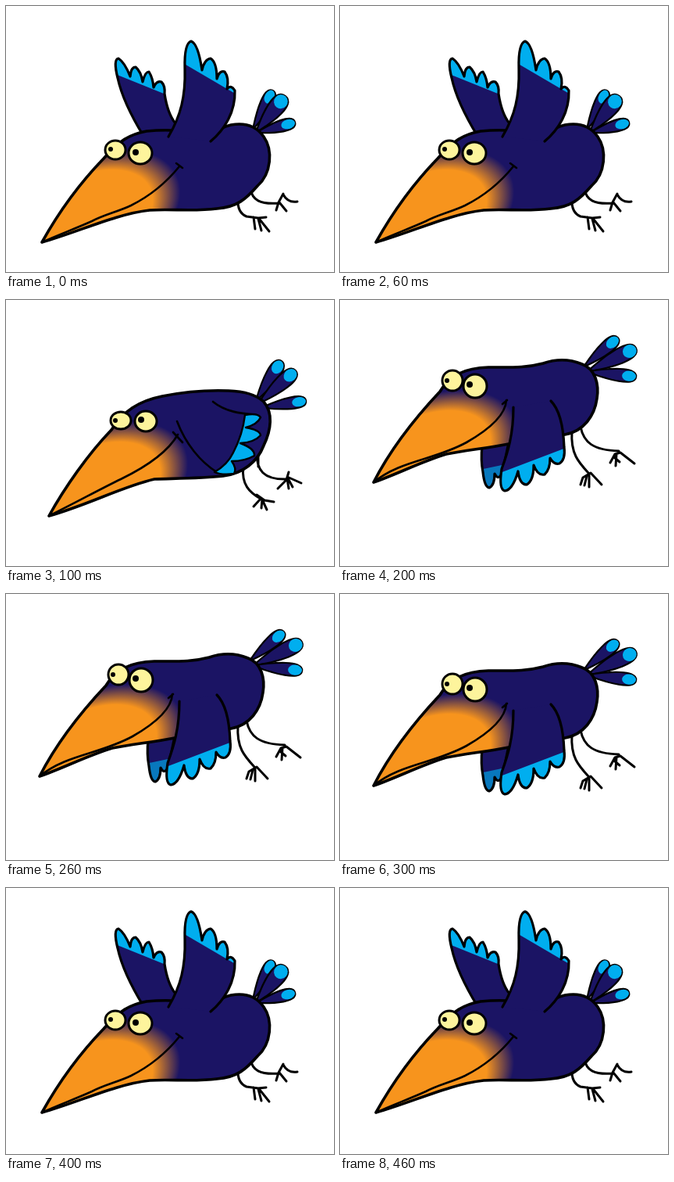
Write an HTML page with a canvas that moves like this. It is 420 px wide and 340 px high and loops after 0.5 s.

```html
<!DOCTYPE html>
<html lang="en">
<head>
<meta charset="utf-8">
<title>Flying bird</title>
<style>
html, body { margin: 0; width: 100%; height: 100%; overflow: hidden; background: #fff; }
canvas { display: block; }
</style>
</head>
<body>
<canvas id="stage" width="420" height="340"></canvas>
<script>
const ctx = document.getElementById('stage').getContext('2d');
const NAVY = '#1b1464', BLUE = '#00aeef', SHADE = '#0878bd';
const ORANGE = '#f7941d', CREAM = '#fdf49c';

// Paths are in stage pixels; tail feathers are [rootX, rootY, tipX, tipY, width].
const up = {
  body: 'M46 302C65 268 92 229 125 195C145 172 158 164 180 160C210 157 240 160 264 167Q273 155 288 152Q316 147 330 167C342 184 340 214 322 230C307 247 296 257 270 259C240 263 210 259 184 261C140 266 95 288 46 302Z',
  glow: [100, 275],
  mouth: 'M218 201L226 207M222 205C205 226 182 244 160 255C143 263 125 267 110 275C88 285 65 293 46 302',
  eyes: [[140, 184, 13, 12, 134, 183, 3], [172, 188, 15, 14, 166, 187, 4]],
  tail: [[318, 154, 341, 109, 11], [322, 159, 357, 116, 16], [324, 161, 369, 149, 11]],
  legs: 'M313 233C315 248 325 254 350 252M346 261L349 251L355 240M350 251L359 262M355 241Q361 252 373 250M297 247Q296 264 308 269L323 271L333 270M317 270L319 285M323 272L327 287M325 273L337 288',
  farWing: {
    shape: 'M176 166C160 140 148 115 143 92Q137 68 144 67Q152 72 159 90Q160 78 166 78Q173 84 175 97Q178 84 183 84Q188 92 189 104Q193 95 199 97Q204 102 203 112Q207 138 217 150L212 168',
    tips: 'M135 85L207 114V60H135Z', color: BLUE
  },
  wing: {
    shape: 'M208 167C224 140 230 115 229 80Q228 48 237 45Q246 48 251 82Q254 68 262 67Q270 72 270 93Q273 82 280 84Q286 92 283 106Q288 100 293 108C294 135 280 158 262 173',
    tips: 'M225 72L297 114V40H225Z', color: BLUE
  }
};

const mid = {
  body: 'M55 276C75 240 105 197 135 166C150 142 170 129 200 123C230 117 260 115 285 116Q316 117 330 130C342 144 340 165 330 186C322 207 303 222 278 225C250 228 220 228 190 229C150 238 105 262 55 276Z',
  glow: [110, 247],
  mouth: 'M214 169L226 182M220 172C208 193 180 213 147 229C120 242 95 256 55 276M219 155C230 184 249 207 270 220M265 130C281 143 300 145 321 147',
  eyes: [[147, 154, 13, 11, 140, 154, 3], [179, 155, 14, 13, 173, 153, 4]],
  tail: [[322, 126, 352, 79, 13], [326, 130, 370, 91, 14], [331, 137, 383, 129, 11]],
  legs: 'M321 196C321 217 329 230 360 229M323 196V213M362 220L359 230L348 241M360 228L362 241M361 228L367 239M360 226L378 234M304 213C301 236 312 246 326 254M321 249L331 256L343 258M327 253L317 264M328 255L327 266M328 255L334 268',
  patch: 'M306 147Q322 144 326 150Q322 159 307 163Q325 166 326 173Q318 182 300 183Q319 190 318 199Q306 206 289 206Q296 216 292 222Q276 224 267 220Q284 210 291 195Q303 172 306 147Z'
};

const down = {
  body: 'M43 233C63 194 95 152 128 117C140 96 160 87 190 86C220 86 238 87 260 81Q286 72 310 82C327 88 332 108 329 126C326 148 312 168 288 172L216 184C184 190 160 192 136 197C103 207 75 222 43 233Z',
  glow: [105, 207],
  mouth: 'M208 133L214 128M213 128C212 148 190 166 162 182C120 205 77 205 43 233',
  eyes: [[144, 103, 13, 13, 137, 103, 3], [173, 110, 15, 15, 166, 108, 4]],
  tail: [[315, 83, 355, 49, 12], [320, 90, 378, 62, 15], [320, 92, 378, 98, 12]],
  legs: 'M308 162C312 182 324 192 357 193M346 208L352 197L359 195L377 209M354 197L353 212M351 201L358 207M297 168C295 197 306 208 319 222M308 236L311 227L321 221L335 236M319 222L319 239M316 225L313 237',
  farWing: {
    shape: 'M182 186Q180 205 183 220Q185 239 191 240Q198 237 198 222Q203 232 208 220L216 182',
    tips: 'M178 217L212 210V245H178Z', color: SHADE
  },
  wing: {
    shape: 'M222 137C222 172 215 194 207 216Q203 242 211 244Q221 243 228 219Q230 236 239 236Q248 231 248 211Q253 225 262 223Q269 217 269 202Q274 211 281 209Q289 204 287 188C286 162 281 140 270 129',
    tips: 'M200 223L292 188V250H200Z', color: BLUE
  }
};

const cycle = [[up, 0], [mid, 0], [down, 0], [down, 12], [up, -15]];

function stroke(path, width) {
  ctx.lineWidth = width;
  ctx.stroke(new Path2D(path));
}

function drawWing({ shape, tips, color }) {
  const outline = new Path2D(shape);
  ctx.fillStyle = NAVY;
  ctx.fill(outline);
  ctx.save();
  ctx.clip(outline);
  ctx.fillStyle = color;
  ctx.fill(new Path2D(tips));
  ctx.restore();
  ctx.lineWidth = 3.2;
  ctx.stroke(outline);
}

function drawFeather([x, y, tipX, tipY, width]) {
  const length = Math.hypot(tipX - x, tipY - y);
  const h = width / 2;
  const outline = new Path2D();
  outline.moveTo(0, 0);
  outline.bezierCurveTo(length * 0.4, -h, length, -h * 2, length, 0);
  outline.bezierCurveTo(length, h * 2, length * 0.4, h, 0, 0);
  ctx.save();
  ctx.translate(x, y);
  ctx.rotate(Math.atan2(tipY - y, tipX - x));
  ctx.lineWidth = 4.5;
  ctx.stroke(outline);
  ctx.fillStyle = NAVY;
  ctx.fill(outline);
  ctx.fillStyle = BLUE;
  ctx.beginPath();
  ctx.ellipse(length - 8, 0, 9, h * 1.1, 0, 0, Math.PI * 2);
  ctx.fill();
  ctx.restore();
}

function drawEye([x, y, rx, ry, pupilX, pupilY, pupilR]) {
  ctx.beginPath();
  ctx.ellipse(x, y, rx, ry, 0, 0, Math.PI * 2);
  ctx.fillStyle = CREAM;
  ctx.fill();
  ctx.lineWidth = 3;
  ctx.stroke();
  ctx.beginPath();
  ctx.arc(pupilX, pupilY, pupilR, 0, Math.PI * 2);
  ctx.fillStyle = '#000';
  ctx.fill();
}

// The beak colour is an oval glow along the beak that fades into the navy body.
function drawBody({ body, glow: [x, y] }) {
  const outline = new Path2D(body);
  const glow = ctx.createRadialGradient(0, 0, 0.82, 0, 0, 1.15);
  glow.addColorStop(0, ORANGE);
  glow.addColorStop(1, NAVY);
  ctx.save();
  ctx.clip(outline);
  ctx.translate(x, y);
  ctx.rotate(-0.47);
  ctx.scale(115, 68);
  ctx.fillStyle = glow;
  ctx.fillRect(-9, -9, 18, 18);
  ctx.restore();
  ctx.lineWidth = 3.6;
  ctx.stroke(outline);
}

function drawBird(bird) {
  stroke(bird.legs, 3);
  bird.tail.forEach(drawFeather);
  if (bird.farWing) drawWing(bird.farWing);
  drawBody(bird);
  stroke(bird.mouth, 2.6);
  if (bird.wing) drawWing(bird.wing);
  if (bird.patch) {
    ctx.fillStyle = BLUE;
    ctx.fill(new Path2D(bird.patch));
    stroke(bird.patch, 2.4);
  }
  bird.eyes.forEach(drawEye);
}

const start = performance.now();

function render() {
  const step = Math.floor((performance.now() - start) / 100) % cycle.length;
  const [bird, dy] = cycle[step];
  ctx.setTransform(1, 0, 0, 1, 0, 0);
  ctx.fillStyle = '#fff';
  ctx.fillRect(0, 0, 420, 340);
  ctx.translate(0, dy);
  ctx.strokeStyle = '#000';
  ctx.lineCap = ctx.lineJoin = 'round';
  drawBird(bird);
  requestAnimationFrame(render);
}
render();
</script>
</body>
</html>
```
